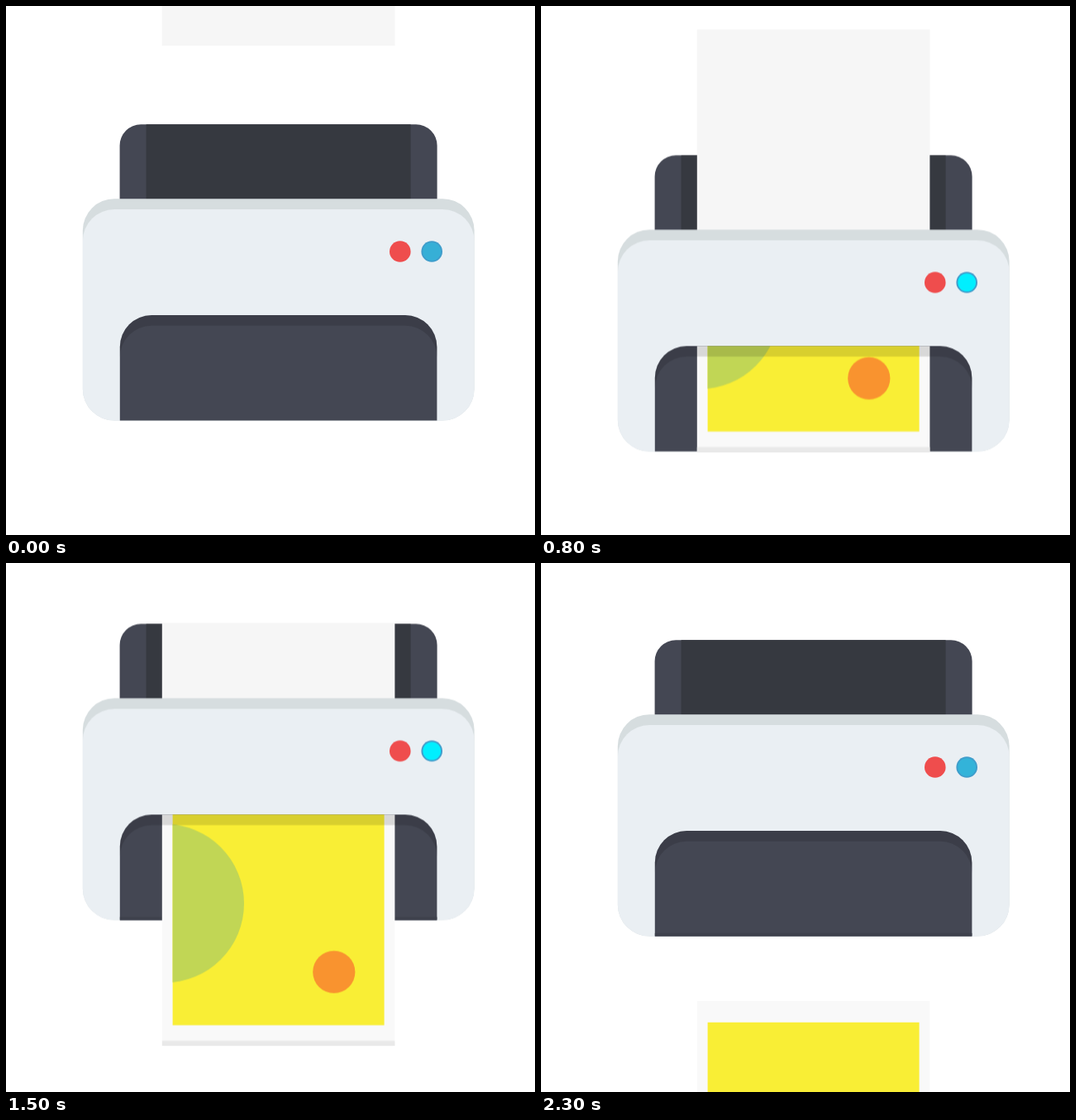
An HTML page that plays this animation: 640 by 640 pixels, repeating every 2.4 s.

```html
<!DOCTYPE html>
<html lang="en">
<head>
<meta charset="utf-8">
<title>Printer</title>
<style>
  html, body { margin: 0; width: 100%; height: 100%; overflow: hidden; background: #fff; }
  svg { display: block; width: 100%; height: 100%; }

  /* Everything advances in 100 ms ticks, 24 per loop */
  .printer, .feed, .light, .lip { animation: 2400ms step-end infinite; }
  .printer { animation-name: bob; }
  .feed { animation-name: feed; }
  .light { animation-name: glow; }
  .lip { animation-name: lip; }

  @keyframes bob {
    0% { transform: translateY(0); }
    4.16% { transform: translateY(44px); }
    8.33% { transform: translateY(80px); }
    12.49% { transform: translateY(98.8px); }
    16.66% { transform: translateY(100px); animation-timing-function: steps(4, end); }
    33.33% { transform: translateY(37.4px); animation-timing-function: steps(4, end); }
    49.99% { transform: translateY(-24.6px); animation-timing-function: steps(5, end); }
    70.83% { transform: translateY(-99.6px); }
    74.99% { transform: translateY(-117.5px); }
    79.16% { transform: translateY(-133px); }
    83.33% { transform: translateY(-141.2px); }
    87.49% { transform: translateY(-128px); }
    91.66% { transform: translateY(-97px); }
    95.83% { transform: translateY(-50px); }
    100% { transform: translateY(0); }
  }
  @keyframes feed {
    0% { transform: translateY(-208px); animation-timing-function: steps(3, end); }
    12.49% { transform: translateY(5.8px); animation-timing-function: steps(5, end); }
    33.33% { transform: translateY(118.6px); animation-timing-function: steps(4, end); }
    49.99% { transform: translateY(206.6px); animation-timing-function: steps(5, end); }
    70.83% { transform: translateY(312.2px); }
    74.99% { transform: translateY(337px); animation-timing-function: steps(2, end); }
    83.33% { transform: translateY(378.2px); animation-timing-function: steps(3, end); }
    95.83% { transform: translateY(580px); }
    100% { transform: translateY(647px); }
  }
  @keyframes glow {
    0% { opacity: .1; }
    4.16% { opacity: .45; }
    8.33% { opacity: .8; }
    12.49%, 83.33% { opacity: 1; }
    87.49% { opacity: .75; }
    91.66% { opacity: .4; }
    95.83% { opacity: .16; }
    100% { opacity: .1; }
  }
  @keyframes lip {
    0% { opacity: 0; }
    62.49%, 100% { opacity: 1; }
  }
</style>
</head>
<body>
<svg viewBox="0 0 640 640">
  <defs>
    <clipPath id="above"><rect y="-800" width="640" height="1040"/></clipPath>
    <clipPath id="below"><rect y="374" width="640" height="1000"/></clipPath>
    <clipPath id="picture"><rect x="201.6" y="25.8" width="256" height="333"/></clipPath>
    <clipPath id="case"><rect x="92.8" y="233.2" width="473.8" height="268.4" rx="38.4"/></clipPath>
  </defs>

  <g class="printer">
    <!-- rear tray -->
    <path fill="#444753" d="M137.6 240V168.8a25.6 25.6 0 0 1 25.6-25.6H496a25.6 25.6 0 0 1 25.6 25.6V240z"/>
    <rect x="169.6" y="143.2" width="320" height="97" fill="#363940"/>

    <!-- blank sheet going in -->
    <g clip-path="url(#above)">
      <g class="feed"><rect x="188.8" y="-128" width="281.6" height="384" fill="#f6f6f6"/></g>
    </g>

    <!-- case -->
    <g clip-path="url(#case)">
      <rect x="92" y="233" width="476" height="269" fill="#d6dddf"/>
      <rect x="92.8" y="246" width="473.8" height="300" rx="38.4" fill="#eaeff3"/>
    </g>
    <circle cx="476.8" cy="297" r="12.8" fill="#ef4d4d"/>
    <circle cx="515.2" cy="297" r="12.8" fill="#3f9dcb"/>
    <circle cx="515.2" cy="297" r="11" fill="#3da8d2"/>
    <circle class="light" cx="515.2" cy="297" r="10.8" fill="#00efff"/>

    <!-- output slot -->
    <path fill="#444753" d="M137.8 501.6V412.4A38.4 38.4 0 0 1 176.2 374H483a38.4 38.4 0 0 1 38.4 38.4V501.6z"/>
    <rect class="lip" x="137.8" y="497.8" width="383.6" height="3.8" fill="#3e414c"/>

    <!-- printed sheet coming out -->
    <g clip-path="url(#below)">
      <g class="feed">
        <rect x="188.8" width="281.6" height="384" fill="#f9f9f9"/>
        <rect x="188.8" y="377.6" width="281.6" height="6.4" fill="#e9e9e9"/>
        <g clip-path="url(#picture)">
          <rect x="200" y="20" width="260" height="340" fill="#f9ee35"/>
          <circle cx="192" cy="211.4" r="96" fill="#c1d655"/>
          <circle cx="396.8" cy="294.4" r="25.6" fill="#f9932f"/>
        </g>
      </g>
    </g>

    <!-- shadow under the slot edge -->
    <path fill="#000" fill-opacity=".13" d="M137.8 425.2V412.4A38.4 38.4 0 0 1 176.2 374H483a38.4 38.4 0 0 1 38.4 38.4v12.8A38.4 38.4 0 0 0 483 386.8H176.2a38.4 38.4 0 0 0-38.4 38.4z"/>
  </g>
</svg>
</body>
</html>
```
